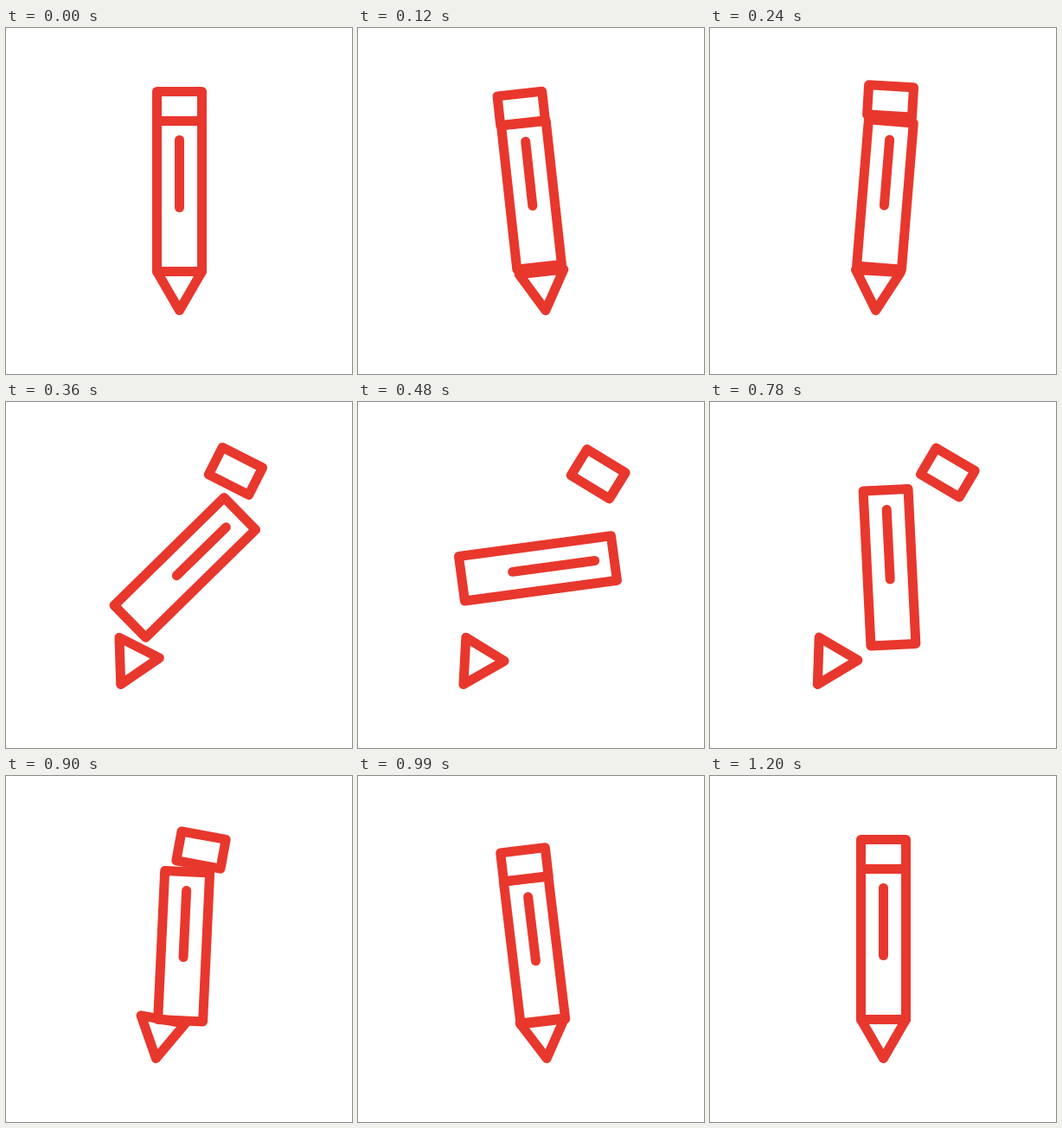
These frames come from a looping animation (400x400 px, 3320 ms). An HTML page with a canvas:

```html
<!DOCTYPE html>
<html lang="en">
<head>
<meta charset="utf-8">
<title>Pencil</title>
<style>
  html, body { margin: 0; width: 100%; height: 100%; overflow: hidden; background: #fff; }
  canvas { display: block; width: 400px; height: 400px; }
</style>
</head>
<body>
<canvas id="stage" width="400" height="400"></canvas>
<script>
const ctx = document.getElementById('stage').getContext('2d');
const LOOP = 3320, STEP = 30, CX = 200.5, HALF = 26;
// Moments of the motion, in ms
const CROUCH = 150, OPEN = 410, PEAK = 600, CLOSE = 790, LAND = 1000, REST = 1200;

// Smooth step from 0 to 1 between two times
function ease(t, from, to) {
  const u = Math.min(1, Math.max(0, (t - from) / (to - from)));
  return u * u * (3 - 2 * u);
}

// Rises from 0 to 1, then falls back
const bump = (t, from, top, to) => ease(t, from, top) - ease(t, top, to);

function part(x, y, angle, ...paths) {
  ctx.save();
  ctx.translate(x, y);
  ctx.rotate(angle);
  for (const points of paths) {
    ctx.beginPath();
    points.forEach(p => ctx.lineTo(...p));
    if (points.length > 2) ctx.closePath();
    ctx.stroke();
  }
  ctx.restore();
}

const box = h => [[-HALF, -h], [HALF, -h], [HALF, h], [-HALF, h]];

function draw(t) {
  const crouch = bump(t, 0, CROUCH, OPEN);
  const land = bump(t, CLOSE, LAND, REST);
  const peak = bump(t, OPEN, PEAK, CLOSE);
  const open = ease(t, CROUCH, OPEN) - ease(t, CLOSE, LAND);

  const tilt = (30.5 * open + 3.5 * peak - 7 * (crouch + land)) * Math.PI / 180;
  const sin = Math.sin(tilt), cos = Math.cos(tilt);
  const spread = 28 * open - 1.5 * peak - 2 * crouch - 11.5 * land;

  ctx.fillStyle = '#fff';
  ctx.fillRect(0, 0, 400, 400);
  ctx.strokeStyle = '#e8372d';
  ctx.lineWidth = 11;
  ctx.lineCap = ctx.lineJoin = 'round';

  // Eraser swings on an arm around the stage centre
  const arm = 109.5 + spread;
  const eraserX = CX + 4.5 * open + 3 * peak + 3.5 * land;
  part(eraserX + arm * sin, 200 - arm * cos, tilt, box(17 + spread * 0.025));

  // The tip slides along the ground on its point
  const tipH = 45 + spread * 0.1;
  part(CX - 150 * sin, 326.5, tilt, [[-HALF, -tipH], [HALF, -tipH], [0, 0]]);

  // The body makes a half turn while its line creeps to the other end
  const bodyX = CX + 7 * open + 1.5 * peak + 3.5 * land;
  const bodyY = 194.5 - 3.3 * open + 3.8 * peak + 7 * land - 1.5 * crouch;
  const stretch = 1 + 0.03 * (open - peak) - 0.045 * (crouch + land);
  const tail = (-65 + 52 * ease(t, PEAK, CLOSE)) * stretch;
  const head = (13 + 52 * ease(t, OPEN, PEAK)) * stretch;
  part(bodyX, bodyY, tilt + Math.PI * ease(t, 200, LAND),
    box(87 * stretch), [[0, tail], [0, head]]);
}

const start = performance.now();
function tick() {
  const t = (performance.now() - start) % LOOP;
  draw(Math.floor(t / STEP) * STEP);
  requestAnimationFrame(tick);
}
tick();
</script>
</body>
</html>
```
